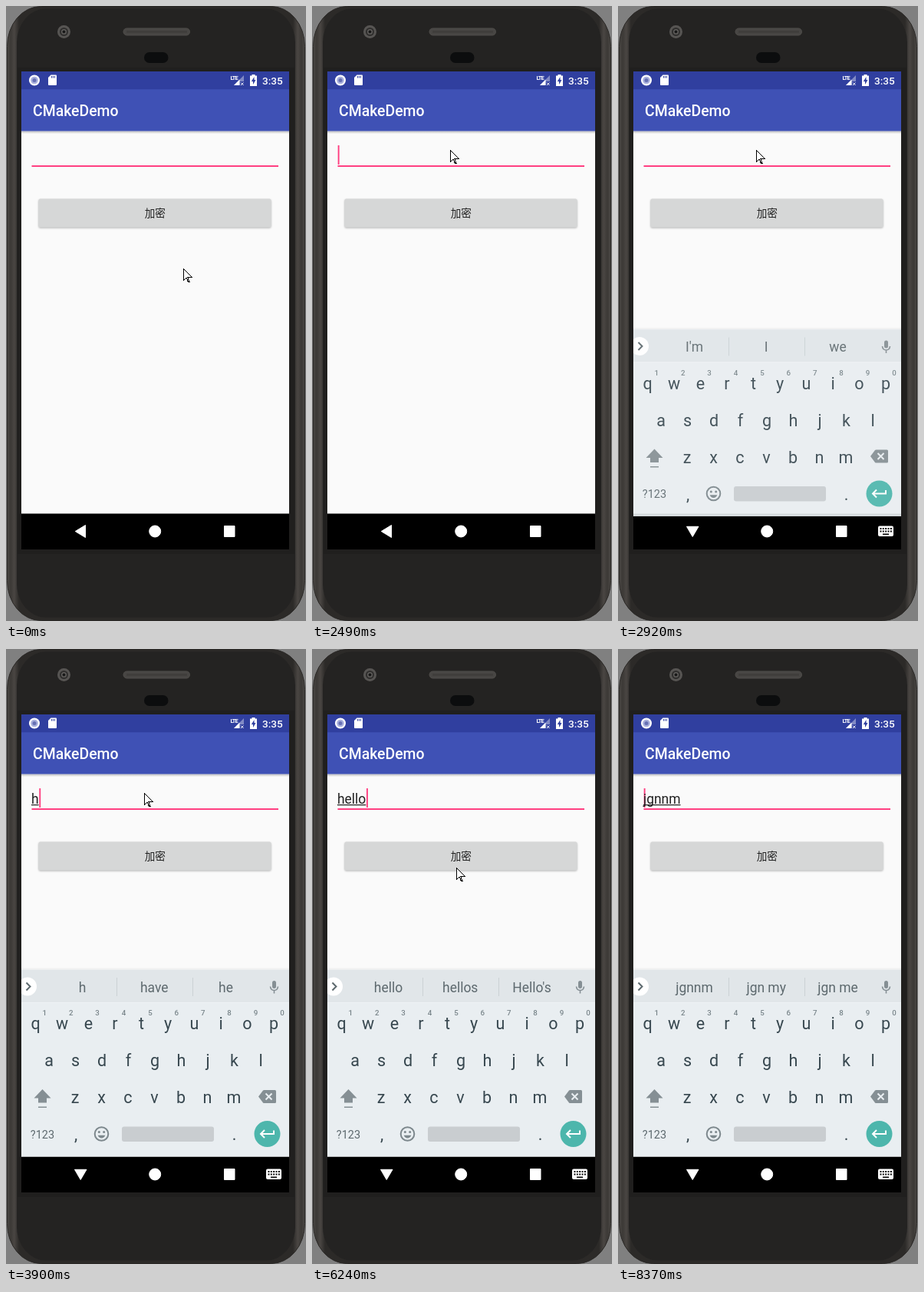
Write an HTML page that moves like this. It is 391 by 799 pixels and loops after 8.65 s.

```html
<!DOCTYPE html>
<html lang="zh-CN">
<head>
<meta charset="utf-8">
<title>CMakeDemo</title>
<style>
html, body { margin: 0; width: 100%; height: 100%; overflow: hidden; background: #808080; }
svg { display: block; width: 391px; height: 799px; font-family: Roboto, "Noto Sans CJK SC", "Noto Sans CJK", sans-serif; }
.mid { text-anchor: middle; }
.med { font-weight: 500; }
.white { fill: #fff; }
.field { font-size: 17.45px; fill: #212121; }
.button { fill: #d6d7d7; filter: drop-shadow(0 1px 1px rgba(0,0,0,.28)); }
.button.near { fill: #d4d5d5; filter: drop-shadow(0 1px 2px rgba(0,0,0,.32)); }
.button.down { fill: #d1d3d2; filter: drop-shadow(0 2px 2.5px rgba(0,0,0,.4)); }
.hint { font-size: 17.45px; fill: #5d696e; }
.key { font-size: 21.5px; fill: #37474f; }
.digit { font-size: 9.7px; font-weight: 500; fill: #79858a; }
.gray { fill: #858f94; }
.line { fill: none; stroke-width: 2; }
</style>
</head>
<body>
<svg viewBox="0 0 391 799">
  <defs>
    <linearGradient id="rim">
      <stop offset="0" stop-color="#4a4744"/>
      <stop offset=".012" stop-color="#3c3936"/>
      <stop offset=".024" stop-color="#4a4643"/>
      <stop offset=".04" stop-color="#2c2a28"/>
      <stop offset=".96" stop-color="#2c2a28"/>
      <stop offset=".976" stop-color="#4a4643"/>
      <stop offset=".988" stop-color="#3c3936"/>
      <stop offset="1" stop-color="#4a4744"/>
    </linearGradient>
    <linearGradient id="shade" x2="0" y2="1">
      <stop stop-opacity=".25"/>
      <stop offset="1" stop-opacity="0"/>
    </linearGradient>
    <clipPath id="screen"><path d="M20 85H369V706H20z"/></clipPath>
  </defs>

  <!-- phone body -->
  <rect x="1.500" y=".5" width="388" height="798" rx="44" ry="52" fill="url(#rim)" stroke="#2a2826"/>
  <rect x="14" y="3.500" width="363" height="791" rx="38" ry="44" fill="#242322"/>
  <rect x="15" y="80" width="361" height="632" fill="#201f1e"/>
  <circle cx="75.500" cy="33.500" r="8.500" fill="#575553"/>
  <circle cx="75.500" cy="33.500" r="5.500" fill="#2f2e2d"/>
  <circle cx="75.500" cy="33.500" r="3.500" fill="#5f5d5b"/>
  <circle cx="75.500" cy="33.500" r="2" fill="#191919"/>
  <rect x="153" y="29" width="86.500" height="9" rx="4.500" fill="#484644" stroke="#4f4d4a"/>
  <path d="M157 33.500H236" stroke="#403e3c" stroke-width="3"/>
  <rect x="180" y="60" width="31.500" height="14" rx="7" fill="#0c0d0e"/>

  <g clip-path="url(#screen)">
    <path d="M20 85H370V706H20z" fill="#fafafa"/>
    <path d="M20 162.500H370V166H20z" fill="url(#shade)"/>
    <path d="M20 108H370V162.500H20z" fill="#3f51b5"/>
    <path d="M20 85H370V108.300H20z" fill="#303f9f"/>
    <text class="white med" x="35" y="142.500" font-size="19.400">CMakeDemo</text>

    <!-- status icons -->
    <circle class="white" cx="37" cy="96.500" r="7"/>
    <circle cx="37" cy="96.500" r="4.800" fill="#a9b0dc"/>
    <circle cx="37" cy="96.500" r="2.500" fill="#6670b4"/>
    <path class="white" d="M58.500 89.500H65Q66 89.500 66 90.500V102Q66 103 65 103H56Q55 103 55 102V93z"/>
    <path d="M59.500 91V93.500M61.500 91V93.500M63.500 91V93.500" stroke="#303f9f"/>
    <text class="white" x="292.500" y="95.500" font-size="7.500" font-weight="700" letter-spacing="-1">LTE</text>
    <path class="white" d="M297 103L310 90V98H304.500V103z" fill-opacity=".4"/>
    <path class="white" d="M297 103L304.500 95.500V103z"/>
    <path d="M306 99.500L309.500 103M309.500 99.500L306 103" stroke="#fff"/>
    <path class="white" d="M320.500 89H324.500V90.500H327V104H318V90.500H320.500z"/>
    <path d="M323.500 92L319.800 98H322V102L325.500 96H323.500z" fill="#303f9f"/>
    <text class="white med" x="334" y="101.500" font-size="13.600">3:35</text>

    <!-- form -->
    <path d="M33.500 207H355V209H33.500z" fill="#ff4081"/>
    <rect id="caret" y="181" width="1.900" height="25" fill="#ff4081"/>
    <text id="field" class="field" x="33" y="200.500"></text>
    <rect id="under" x="33" y="202" height="1.200" fill="#212121"/>
    <rect id="button" class="button" x="42.500" y="250.500" width="303" height="37" rx="2"/>
    <text class="mid" x="194.300" y="274" font-size="13.600" fill="#212121">加密</text>

    <path d="M20 659.500H370V706H20z"/>

    <!-- keyboard -->
    <g id="board">
      <path d="M20 414.500H370V417H20z" fill="#000" fill-opacity=".035"/>
      <path d="M20 416.500H370V659.500H20z" fill="#e9eef1"/>
      <path d="M20 417H370V459H20z" fill="#e1e6e9"/>
      <path d="M20 459.500H370" stroke="#eff3f5"/>
      <circle class="white" cx="28" cy="438.500" r="12"/>
      <path class="line" d="M26.500 433.500L31.500 438.500L26.500 443.500" stroke="#5d696e"/>
      <path d="M144.500 427V451M243.500 427V451" stroke="#cbd2d5"/>
      <g id="hints"></g>
      <g class="gray">
        <rect x="347" y="431" width="5" height="10" rx="2.500"/>
        <path class="line" d="M344.500 438.500Q345 443.500 349.500 443.500T354.500 438.500M349.500 443.500V447.500" stroke="#858f94" style="stroke-width:1.600"/>
        <path d="M47.500 572L58.500 583.500H53V589.500H42V583.500H36.500zM42 594.500H53V596H42z"/>
        <path d="M329 581.500L335 573.500Q335.500 573 336.500 573H350.500Q352 573 352 574.500V588.500Q352 590 350.500 590H336.500Q335.500 590 335 589.500z"/>
      </g>
      <path class="line" d="M338.500 577.500L346.500 585.500M346.500 577.500L338.500 585.500" stroke="#e9eef1"/>
      <g id="keys"></g>
      <text class="mid" x="47.500" y="635.500" font-size="14.500" fill="#5d696e">?123</text>
      <circle class="line" cx="124.500" cy="630" r="8.800" stroke="#7d888d"/>
      <g fill="#7d888d">
        <circle cx="121.300" cy="627.500" r="1.500"/>
        <circle cx="127.700" cy="627.500" r="1.500"/>
        <path d="M119.700 631.700H129.300Q127.800 635.500 124.500 635.500T119.700 631.700z"/>
      </g>
      <rect x="151" y="620.500" width="120" height="19.500" rx="3" fill="#c9cdd0"/>
      <circle cx="340.500" cy="630" r="17" fill="#4db6ac"/>
      <path class="line" d="M349 625.500V630H332.500M337 625L332 630L337 635" stroke="#fff"/>
    </g>

    <!-- navigation -->
    <g class="white" stroke="#fff" stroke-linejoin="round">
      <path id="back" d="M90.300 682.500L103.500 674.500V690.500z"/>
      <path id="hide" d="M89.500 676.300H105L97.200 689.500z"/>
      <circle cx="194.200" cy="682.500" r="7.500"/>
      <path d="M284.500 675.500H298V689.500H284.500z"/>
    </g>
    <g id="picker">
      <rect class="white" x="339" y="675.500" width="20" height="13.500" rx="2"/>
      <path d="M341.500 679H357M341.500 682.500H357" stroke="#000" stroke-width="1.800" stroke-dasharray="1.900 1.450"/>
      <path d="M345 686.300H353" stroke="#000" stroke-width="1.600"/>
    </g>
  </g>

  <path id="mouse" d="M.5 .5V15.500L4 12L6.500 17.500H8L5.800 11.500H11.500z" fill="#fff" stroke="#000" shape-rendering="crispEdges"/>
</svg>
<script>
const LOOP = 8650;
const $ = id => document.getElementById(id);

function addText(parent, cls, x, y, text) {
  const el = document.createElementNS('http://www.w3.org/2000/svg', 'text');
  el.setAttribute('class', 'mid ' + cls);
  el.setAttribute('x', x);
  el.setAttribute('y', y);
  el.textContent = text;
  $(parent).append(el);
  return el;
}

function addRow(cls, letters, x, y, pitch = 34.5) {
  [...letters].forEach((c, i) => addText('keys', cls, x + i * pitch, y, c));
}
addRow('key', 'qwertyuiop', 38.5, 494);
addRow('digit', '1234567890', 50.3, 476, 34.4);
addRow('key', 'asdfghjkl', 56, 542);
addRow('key', 'zxcvbnm', 90, 590);
addRow('key', ',.', 91, 638, 206.5);
const hints = [99.5, 193.2, 286.5].map(x => addText('hints', 'hint', x, 445.5, ''));

// Each step keeps every value it does not change.
const steps = [
  [0, { mouse: [231, 341], caret: 0, text: '', under: 0, button: '', board: null, hints: "I'm I we", fade: 1 }],
  [250, { caret: 1 }],
  [780, { caret: 0 }],
  [1370, { caret: 1 }],
  [1830, { caret: 0 }],
  [1980, { mouse: [230, 331] }],
  [2130, { mouse: [220, 291] }],
  [2250, { mouse: [199, 232] }],
  [2370, { mouse: [183, 194], caret: 1 }],
  [2490, { mouse: [180, 187] }],
  [2800, { caret: 0, board: [60, .5] }],
  [2920, { board: [3.5, .92] }],
  [3070, { board: [0, 1] }],
  [3220, { caret: 1 }],
  [3780, { caret: 0 }],
  [3900, { caret: 1, text: 'h', under: 1, hints: 'h have he' }],
  [4150, { text: 'he', hints: 'he her hey' }],
  [4580, { text: 'hel', hints: 'hel hello help' }],
  [4730, { text: 'hell', hints: "hell hello he'll" }],
  [5170, { text: 'hello', hints: "hello hellos Hello's" }],
  [5720, { caret: 0 }],
  [5970, { mouse: [181, 246] }],
  [6090, { mouse: [182, 295] }],
  [6240, { mouse: [188, 284], caret: 1 }],
  [6360, { mouse: [188, 274] }],
  [6670, { mouse: [179, 274], caret: 0 }],
  [6920, { button: 'near' }],
  [7040, { button: 'down', text: 'jgnnm', under: 0, caret: 1 }],
  [7160, { button: '', under: 1, hints: 'jgnnm jgn_my jgn_me', fade: .6 }],
  [7310, { fade: 1 }],
  [7550, { mouse: [185, 283] }],
  [7700, { mouse: [262, 342], caret: 0 }],
  [7820, { mouse: [378, 427] }],
  [7940, { mouse: [400, 440] }],
  [8370, { caret: 1 }]
];

function show(id, on) {
  $(id).style.visibility = on ? 'visible' : 'hidden';
}

function draw(s) {
  const [mx, my] = s.mouse;
  $('mouse').setAttribute('transform', `translate(${mx} ${my})`);

  $('field').textContent = s.text;
  const width = s.text ? $('field').getComputedTextLength() : 0;
  const atStart = s.text === 'jgnnm';
  $('caret').setAttribute('x', 33.7 + (atStart ? 0 : width));
  $('under').setAttribute('width', width);
  show('caret', s.caret);
  show('under', s.under);
  $('button').setAttribute('class', 'button ' + s.button);

  const [dy, alpha] = s.board || [0, 0];
  $('board').setAttribute('transform', `translate(0 ${dy})`);
  $('board').setAttribute('opacity', alpha);
  show('board', s.board);
  show('hide', s.board);
  show('picker', s.board);
  show('back', !s.board);

  s.hints.split(' ').forEach((word, i) => hints[i].textContent = word.replace('_', ' '));
  $('hints').setAttribute('opacity', s.fade);
}

let last = -1;
function tick() {
  const t = performance.now() % LOOP;
  const past = steps.filter(([at]) => at <= t);
  if (past.length !== last) {
    last = past.length;
    draw(Object.assign({}, ...past.map(([, change]) => change)));
  }
  requestAnimationFrame(tick);
}
tick();
</script>
</body>
</html>
```
